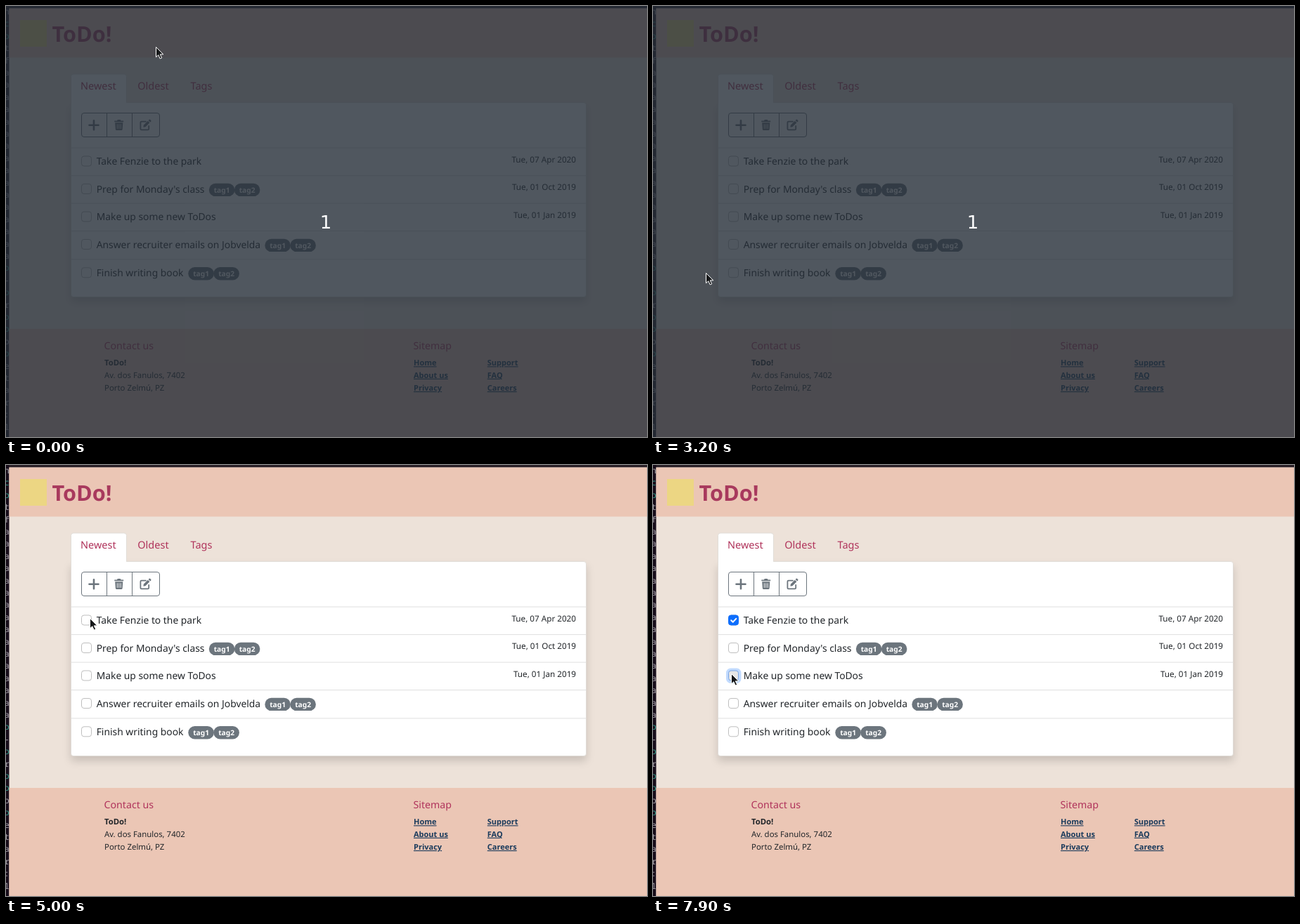
An HTML page that plays this animation: 912x614 px, repeating every 8 s.

```html
<!DOCTYPE html>
<html lang="en">
<head>
<meta charset="utf-8">
<title>ToDo!</title>
<style>
  html, body { margin: 0; width: 100%; height: 100%; overflow: hidden; background: #ede2d9; }
  svg { display: block; width: 912px; height: 614px; }
  text { font: 13.85px "Noto Sans", sans-serif; fill: #212529; text-rendering: geometricPrecision; white-space: pre; }
  .title { font-size: 30.7px; font-weight: 700; fill: #a8395d; }
  .tab { font-size: 14.5px; fill: #b0335b; }
  .date { font-size: 11.7px; text-anchor: end; }
  .head { font-size: 14.2px; fill: #b0335b; }
  .small { font-size: 11.4px; }
  .bold { font-size: 11.3px; font-weight: 700; }
  .link { font-size: 11px; font-weight: 700; fill: #1b3b5c; text-decoration: underline; }
  .tag { font-size: 10.2px; font-weight: 700; fill: #fff; text-anchor: middle; }
  .code { font: 12px "Noto Sans Mono", monospace; fill: #a9a4ac; }
  .green { fill: #2f9a86; }
  .count { font: 26px "DejaVu Sans", sans-serif; fill: #fff; text-anchor: middle; }
  #card { filter: drop-shadow(0 7px 6px rgba(0, 0, 0, .15)); }
</style>
</head>
<body>
<svg id="stage" viewBox="0 0 912 614"></svg>
<script>
const T = 8000;

const text = (x, y, s, cls = '') => `<text x="${x}" y="${y}" class="${cls}">${s}</text>`;
const rect = (x, y, w, h, fill, more = '') =>
  `<rect x="${x}" y="${y}" width="${w}" height="${h}" fill="${fill}" ${more}/>`;
const path = (d, more) => `<path d="${d}" ${more}/>`;
const group = (id, body, more = '') => `<g id="${id}" ${more}>${body}</g>`;

const tag = (x, y, s) =>
  rect(x, y - 9.2, 36.6, 18.4, '#6c757d', 'rx="9.2"') + text(x + 18.3, y + 3.8, s, 'tag');

const box = (y, fill = '#fff', line = '#bfbfbf') =>
  rect(107.5, y - 7, 14, 14, fill, `rx="3.5" stroke="${line}"`);
const ring = y => rect(104, y - 10.5, 21.5, 21.5, '#c2dbfe', 'rx="6.5"');
const pressed = y => ring(y) + box(y, '#e6e6e6', '#79a5e5');
const checked = y => box(y, '#0d6efd', '#0d6efd') +
  path(`M111.2 ${y + .2}l2.5 2.5 4.6 -4.8`,
    'fill="none" stroke="#fff" stroke-width="2" stroke-linecap="round" stroke-linejoin="round"');

// checkbox y, label, x of the tags, date
const rows = [
  [221, 'Take Fenzie to the park', 0, 'Tue, 07 Apr 2020'],
  [260.5, "Prep for Monday's class", 288.8, 'Tue, 01 Oct 2019'],
  [300, 'Make up some new ToDos', 0, 'Tue, 01 Jan 2019'],
  [339.5, 'Answer recruiter emails on Jobvelda', 368.3, ''],
  [379.8, 'Finish writing book', 259.3, '']
];

const row = ([y, label, tx, date]) =>
  rect(93, y - 19.4, 732, 1, '#dfdfdf') + box(y) + text(128.7, y + 5, label) +
  (tx ? tag(tx, y + 1.4, 'tag1') + tag(tx + 36, y + 1.4, 'tag2') : '') +
  text(811, y + 1.7, date, 'date');

function terminal() {
  const letters = 'ncotf' + 'a'.repeat(16) + 'o-oroopoetar:1';
  const green = [1, 2, 21, 23, 25, 26, 28];
  return rect(0, 0, 912, 614, '#170d1a') + rect(4.5, 0, 908, 3.5, '#2a2027') +
    [...letters].map((c, i) =>
      text(-2.6, 12 + 17.4 * i, c, green.includes(i) ? 'code green' : 'code')).join('');
}

function header() {
  return rect(4.5, 3.5, 908, 70, '#ebc6b5') + rect(20, 20, 38, 38, '#ecd683') +
    text(65.5, 51, 'ToDo!', 'title');
}

function card() {
  const line = 'fill="none" stroke="#6c757d"';
  const icons =
    path('M118.5 169.7h13M125 163.2v13',
      'stroke="#6c757d" stroke-width="2.6" stroke-linecap="round"') +
    path('M154.3 163.4h3.6l.9 -1.3h3.9l.9 1.3h3.6v1.8h-12.9zM155.2 166.2h11.1l-.7 9.5q-.1 1.4 -1.5 1.4h-6.7q-1.4 0 -1.5 -1.4z',
      'fill="#6c757d"') +
    path('M158.3 168.3v6.6M160.8 168.3v6.6M163.3 168.3v6.6', 'stroke="#fff" stroke-width=".9"') +
    path('M199 164.6h-6.2q-1.4 0 -1.4 1.4v9q0 1.4 1.4 1.4h9q1.4 0 1.4 -1.4v-4',
      'fill="none" stroke="#6c757d" stroke-width="1.8" stroke-linecap="round"') +
    path('M195.4 172.7l.4 -3 6 -6 2.6 2.6 -6 6zM202.6 162.9l1 -1q.8 -.7 1.6 0l1 1q.7 .8 0 1.6l-1 1z',
      'fill="#6c757d"');
  const frame = 'stroke="#dcd8d4" stroke-width=".8"';
  return group('card',
      rect(92.5, 137.5, 733, 277, '#fff', `rx="3.5" ${frame}`)) +
    path('M92.5 142V100.500q0 -3.5 3.500 -3.500h72q3.500 0 3.500 3.500V137.500', `fill="#fff" ${frame}`) +
    rect(93, 136, 78, 8, '#fff') +
    text(106, 119, 'Newest', 'tab') + text(187.3, 119, 'Oldest', 'tab') + text(262.5, 119, 'Tags', 'tab') +
    rect(107.5, 152.5, 111, 34, 'none', 'rx="3.5" stroke="#6c757d"') +
    path('M143.5 152.5v34M179.5 152.5v34', line) + icons + rows.map(row).join('');
}

function footer() {
  const links = [['Home', 'Support'], ['About us', 'FAQ'], ['Privacy', 'Careers']];
  const ys = [512.3, 529.8, 548];
  return rect(4.5, 460, 908, 154, '#ebc6b5') +
    text(139.5, 489.3, 'Contact us', 'head') + text(579.5, 489.3, 'Sitemap', 'head') +
    text(140, ys[0], 'ToDo!', 'bold') +
    text(140, ys[1], 'Av. dos Fanulos, 7402', 'small') +
    text(140, ys[2], 'Porto Zelmú, PZ', 'small') +
    links.map(([a, b], i) => text(580, ys[i], a, 'link') + text(684.8, ys[i], b, 'link')).join('');
}

const arrow = path('M.5 .5V14.8L3.8 11.800 6.200 17 8.700 15.900 6.300 10.900H10.800Z',
  'fill="#16181a" stroke="#fff" stroke-width="1" stroke-linejoin="round"');
const beamLine = 'M-2.5 -7.500Q0 -7.500 0 -5.500V5.500Q0 7.500 -2.500 7.500M2.500 -7.500Q0 -7.500 0 -5.500M0 5.500Q0 7.500 2.500 7.500';
const beam = path(beamLine, 'fill="none" stroke="#fff" stroke-width="2.6"') +
  path(beamLine, 'fill="none" stroke="#222" stroke-width="1.1"');

document.getElementById('stage').innerHTML =
  terminal() + rect(4.5, 3.5, 908, 611, '#ede2d9') + header() + card() + footer() +
  group('press1', pressed(221)) +
  group('focus1', ring(221)) +
  group('check1', checked(221)) +
  group('press3', pressed(300)) +
  group('dim', rect(0, 0, 912, 614, 'rgba(37,46,56,.8)') + text(455, 317, '1', 'count')) +
  group('cursor', group('arrow', arrow) + group('beam', beam));

const loop = { duration: T, iterations: Infinity };

// Hard switch: visible (or hidden, if inside is 0) between two times.
function show(id, from, to, inside = 1) {
  const key = (t, opacity) => ({ offset: t / T, opacity, easing: 'step-end' });
  const frames = [key(from, inside), key(to, 1 - inside)];
  if (from > 0) frames.unshift(key(0, 1 - inside));
  if (to < T) frames.push(key(T, 1 - inside));
  document.getElementById(id).animate(frames, loop);
}

show('dim', 0, 3300);
show('press1', 5800, 6000);
show('focus1', 6000, 7900);
show('check1', 6000, T);
show('press3', 7900, T);
show('beam', 6500, 7100);
show('arrow', 6500, 7100, 0);

// time, x, y of the pointer; it moves on every 100 ms
const track = [
  [0, 213, 58], [400, 213, 58], [600, 230, 140], [800, 283, 400], [1000, 304, 516],
  [1600, 304, 516], [1900, 268, 508], [2200, 145, 478], [2500, 83, 468],
  [2800, 78, 438], [3200, 75, 380], [3300, 75, 380], [3400, 74, 361],
  [3600, 77, 325], [3900, 97, 262], [4100, 119, 224], [4300, 117, 214],
  [4600, 105, 224], [4700, 105, 224], [5000, 119, 218], [5200, 119, 218],
  [5400, 117, 218], [6100, 117, 218], [6300, 124, 248], [6600, 136, 305],
  [7000, 132, 306], [7200, 116, 294], [7400, 111, 297], [T, 111, 297]
];

document.getElementById('cursor').animate(track.map(([t, x, y], i) => {
  const next = track[i + 1];
  return {
    offset: t / T,
    transform: `translate(${x}px, ${y}px)`,
    easing: next ? `steps(${(next[0] - t) / 100}, end)` : 'linear'
  };
}), loop);
</script>
</body>
</html>
```
